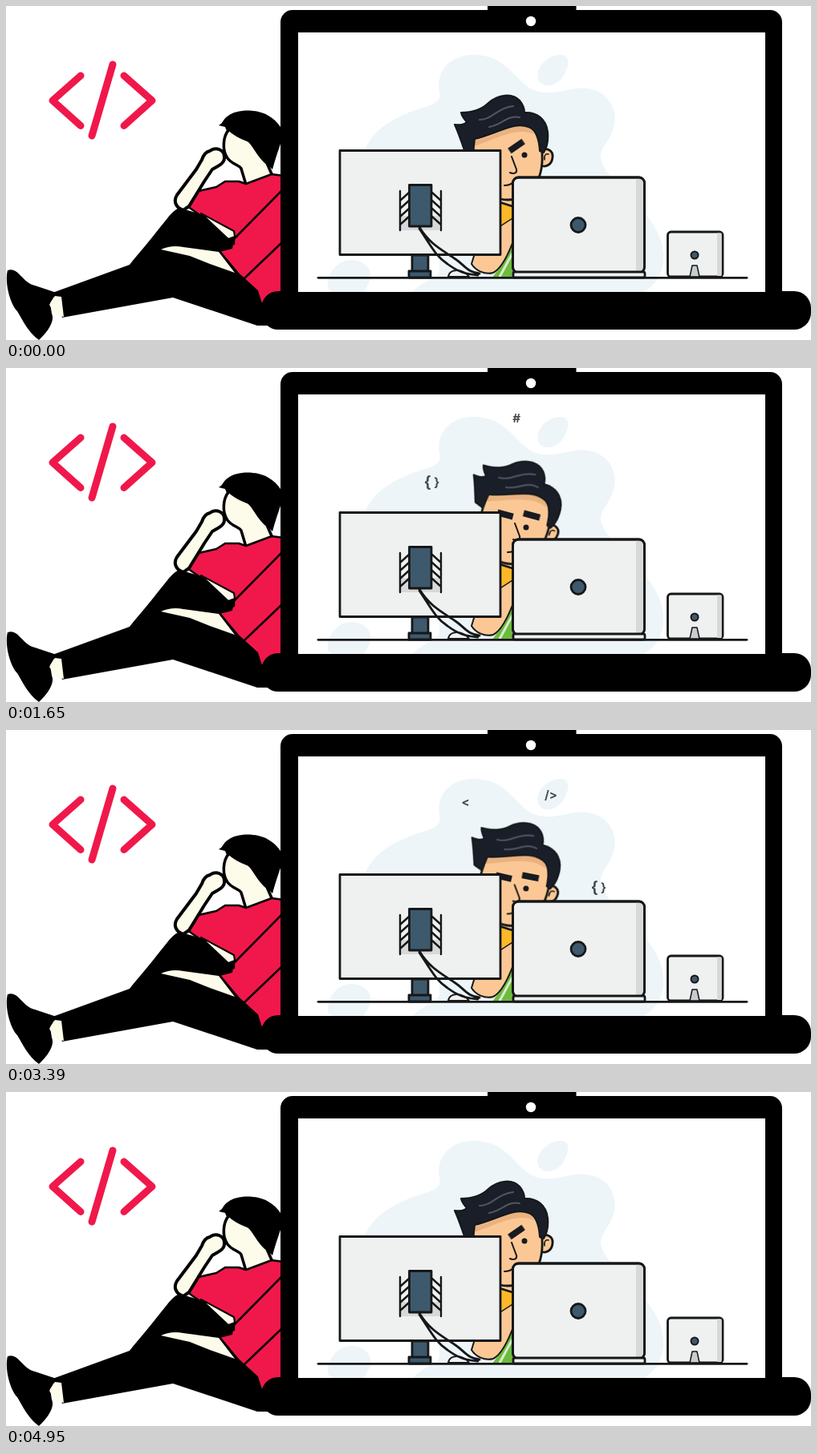
Recreate the animation shown at these times as an HTML page. Size 1003x417 px, loop 5180 ms.

```html
<!DOCTYPE html>
<html lang="en">
<head>
<meta charset="utf-8">
<title>Developer at work</title>
<style>
  html, body { margin: 0; width: 100%; height: 100%; overflow: hidden; background: #fff; }
  svg { display: block; width: 100%; height: 100%; }
  .ink { stroke: #151719; stroke-width: 2.8; stroke-linejoin: round; stroke-linecap: round; }
  .line { fill: none; }
  .shell { fill: #eff1f0; }
  .shade { fill: #d7d9d9; }
  .steel { fill: #3e596c; }
  .skin { fill: #fbc895; }
  .pale { fill: #fdfbea; }
  .red { fill: #f0184b; }
  .blob { fill: #edf5f9; }

  .pose { animation: pose 5180ms infinite; }
  @keyframes pose {
    0%, 18.92% { transform: var(--a); animation-timing-function: ease-in-out; }
    30.5%, 63.13% { transform: var(--b); animation-timing-function: ease-in-out; }
    74.71%, 100% { transform: var(--a); }
  }
  .head { --a: rotate(0deg); --b: rotate(17.3deg); transform-origin: 619px 219px; }
  .brow { --a: translate(636px, 175px) rotate(-35deg); --b: translate(655px, 184px) rotate(15deg); }
  .far-brow { --a: translate(600px, 190px) rotate(-10deg); --b: translate(622px, 183px) rotate(15deg); }
  .eye { --a: translate(646px, 186px); --b: translate(648px, 199px); }
  .nose { --a: translate(0px, 0px); --b: translate(4px, 6px); }

  .symbol {
    font: 700 15px Inter, sans-serif;
    fill: #444950;
    text-anchor: middle;
    offset-path: path("M513 188 C519 150 570 63 635 63 C692 63 726 140 746 225");
    offset-rotate: 0deg;
    animation: arc 5180ms var(--start) infinite both;
  }
  @keyframes arc {
    0% { offset-distance: 0%; animation-timing-function: cubic-bezier(.3, .18, .7, .82); }
    45.37%, 100% { offset-distance: 100%; }
  }
</style>
</head>
<body>
<svg viewBox="0 0 1003 417">
  <!-- Code icon -->
  <g fill="none" stroke="#f0184b" stroke-width="9" stroke-linecap="round" stroke-linejoin="round">
    <path d="M93 87 L58 118 L93 149.500 M133 73 L107 162 M147 87 L182 118 L147 149.500"/>
  </g>

  <!-- Seated person -->
  <g stroke-linejoin="round">
    <path d="M265 149 C271 146 270 141 277 137 C287 129 312 128 327 137 C336 142 340 148 344 154 L342 172 L332 202 L300 175 L275 156 L273 151Z"/>
    <path class="pale" stroke="#000" stroke-width="3.500" d="M278 154 C270 163 269 180 276 190 C282 198 290 198 293 203 L299 223 L332 212 L325 196 C314 188 308 171 302 168 C292 164 284 160 278 154Z"/>
    <path d="M278 153 L306 160 L339 178 L332 204 L326 198 C315 190 311 174 304 169 C294 164 285 162 278 153Z"/>
    <path class="red" stroke="#000" stroke-width="2.500" d="M240 231 L262 226 L273 219 L290 219 L299 222 L331 210 L346 212 V372 H318 L313 356 L290 335 L266 306 L284 297 V282 L243 262 L226 250Z"/>
    <path class="pale" stroke="#000" stroke-width="4" d="M254 181 C262 175 272 180 272 188 C273 195 268 198 264 200 L257 204 L247 219 L228 250 L221 255 C212 252 208 244 213 236 L237 204 L244 192 C246 186 249 182 254 181Z"/>
    <path d="M216 252 L243 260 L284 290 L282 303 L266 307 L290 335 L313 356 L318 372 L326 362 V399 L313 399 L208 364 L70 389 L58 358 L154 323 C165 309 180 292 193 275 C202 264 208 255 216 252Z"/>
    <path class="pale" stroke="#000" stroke-width="2" d="M243 259 L284 281 L285 288 L277 291Z"/>
    <path class="pale" d="M193 304 C202 300 211 299 221 301 L265 307 L285 333 L254 322 L229 312Z"/>
    <path d="M283 292 L343 231 M297 340 L343 296" stroke="#000" stroke-width="2.500"/>
    <path d="M2 330 C15 325 20 345 36 349 L63 358 L55 371 L57 384 C62 395 48 411 41 417 C28 408 20 391 14 381 C5 372 -2 345 2 330Z"/>
    <path class="pale" d="M61 362 L69 363 L72 388 L62 386 L54 373Z"/>
  </g>

  <!-- Big laptop -->
  <rect x="600" width="110.500" height="10"/>
  <rect x="342" y="5" width="625" height="370" rx="15"/>
  <rect x="318" y="356" width="685" height="48" rx="21"/>
  <rect x="364" y="33" width="582" height="324" fill="#fff"/>
  <circle cx="654" cy="19" r="6.200" fill="#fff"/>

  <!-- Backdrop -->
  <path class="blob" d="M540 107 C535 78 558 59 587 61 C630 64 636 101 664 107 C688 112 702 100 724 103 C750 106 765 130 756 155 C750 173 736 180 743 196 C752 222 800 250 815 290 C826 322 815 345 795 357 H507 C518 343 540 340 540 330 V250 L444 200 C444 168 466 148 500 134 C525 123 544 124 540 107Z"/>
  <path class="blob" d="M663 91 C659 78 673 62 690 61 C702 60 703 72 697 82 C692 99 668 106 663 91Z"/>
  <path class="blob" d="M401 346 C403 329 416 316 433 317 C451 319 459 334 452 346 L446 357 H408 C402 355 400 352 401 346Z"/>

  <!-- Flying symbols -->
  <g class="symbol" style="--start: 530ms"><text y="5.400">#</text></g>
  <g class="symbol" style="--start: 1280ms" font-weight="800">
    <text x="-5.500" y="6.800" font-size="19">{</text>
    <text x="6" y="5.400" font-size="15">}</text>
  </g>
  <g class="symbol" style="--start: 2030ms"><text y="5.600">/&gt;</text></g>
  <g class="symbol" style="--start: 2635ms"><text y="5.400">&lt;</text></g>

  <!-- Body -->
  <path class="skin" d="M612 232 H634 V339 H612Z"/>
  <path class="ink" d="M612 244 L634 251 V264 L614 277Z" fill="#fdb827"/>
  <path d="M606 339 C617 325 626 308 634 292 V339Z" fill="#6dbb3c"/>
  <path class="line" d="M615 338 C622 326 627 315 634 304" stroke="#d9ecd0" stroke-width="3"/>
  <path class="skin" d="M634 264 L614 277 V306 L584 309 L580 322 C585 330 596 336 607 333 C619 327 628 305 634 288Z"/>
  <path class="ink line" style="stroke-width: 2" d="M584 309 L580 322 C585 330 596 336 607 333 C619 327 628 305 634 288"/>

  <!-- Head -->
  <g class="pose head">
    <path class="skin ink" d="M667 181 C673 176 682 180 681 189 C680 198 673 202 666 199Z"/>
    <path class="ink line" style="stroke-width: 1.500" d="M671 192 C670 186 673 184 676 185"/>
    <path class="skin ink" d="M582 162 C600 142 650 135 664 162 L668 184 C670 222 650 242 625 242 C600 242 582 220 582 180Z"/>
    <path d="M584 168 C610 163 632 144 653 152 L658 160 C636 151 615 164 584 175Z" fill="#e9b27f"/>
    <path class="ink" style="stroke-width: 2" fill="#191e29" d="M567 133 C580 133 592 130 601 121 C613 110 631 108 640 118 C645 124 646 129 646 133 C661 132 673 141 675 157 C676 168 674 177 670 183 L665 181 C664 165 660 154 651 151 C632 144 611 160 584 166 L582 184 L571 180 C567 168 563 157 559 148 C565 149 570 148 574 145 C571 141 568 138 567 133Z"/>
    <path class="line" d="M590 142 C606 142 612 127 632 125 M602 151 C619 148 624 136 640 139" stroke="#515761" stroke-width="2" stroke-linecap="round"/>
  </g>
  <rect class="pose far-brow" x="-10" y="-4" width="20" height="8" fill="#171a20"/>
  <rect class="pose brow" x="-10.500" y="-4" width="21" height="8" fill="#171a20"/>
  <circle class="pose eye" r="3.500" fill="#171a20"/>
  <g class="pose nose">
    <path class="ink line" style="stroke-width: 2" d="M630 188 L636 204 C637 209 632 210 628 208 M621 224 C625 224 629 223 632 220"/>
  </g>

  <!-- Monitor -->
  <g class="ink">
    <rect class="shell" x="416" y="180.500" width="200" height="130"/>
    <path class="shade" d="M492 262 H540 V280 H492Z" stroke="none"/>
    <path class="line" stroke-width="2.400" d="M491 231 V280 M542 231 V280 M502 233 L491 243 M502 243 L491 253 M502 253 L491 263 M502 263 L491 273 M531 233 L542 243 M531 243 L542 253 M531 253 L542 263 M531 263 L542 273"/>
    <rect class="steel" x="502.500" y="223.500" width="27.500" height="51.500"/>
    <rect class="steel" x="506" y="311" width="20" height="22"/>
    <rect class="steel" x="502" y="331" width="27" height="8"/>
    <path class="shell" stroke-width="2" d="M551 338 C553 327 570 328 577 338Z"/>
    <path class="line" d="M515 276 C528 298 546 306 560 316 C572 324 574 332 590 334 M515 278 C530 300 535 312 550 322 C562 331 572 335 588 336"/>
  </g>

  <!-- Small laptop and tablet -->
  <g class="ink">
    <rect class="shell" x="631.500" y="214" width="164" height="119" rx="7"/>
    <path class="shade" stroke="none" d="M785 215.500 H789 Q794 216 794 222 V326 Q794 331 789 331.500 H785Z"/>
    <rect class="line" x="631.500" y="214" width="164" height="119" rx="7"/>
    <rect class="shell" x="632" y="332" width="164" height="7" rx="2"/>
    <circle class="steel" cx="713" cy="273.500" r="9"/>
    <rect class="shell" x="824.500" y="282" width="68.500" height="56" rx="4"/>
    <rect class="shade" stroke="none" x="886" y="283.500" width="5.500" height="53.500"/>
    <circle class="steel" cx="858" cy="311" r="4.500" stroke-width="2"/>
    <path fill="#c8cccd" stroke-width="1.500" d="M855 324 H861 L864 338 H852Z"/>
    <path class="line" d="M389 339.300 H923"/>
  </g>
</svg>
</body>
</html>
```
